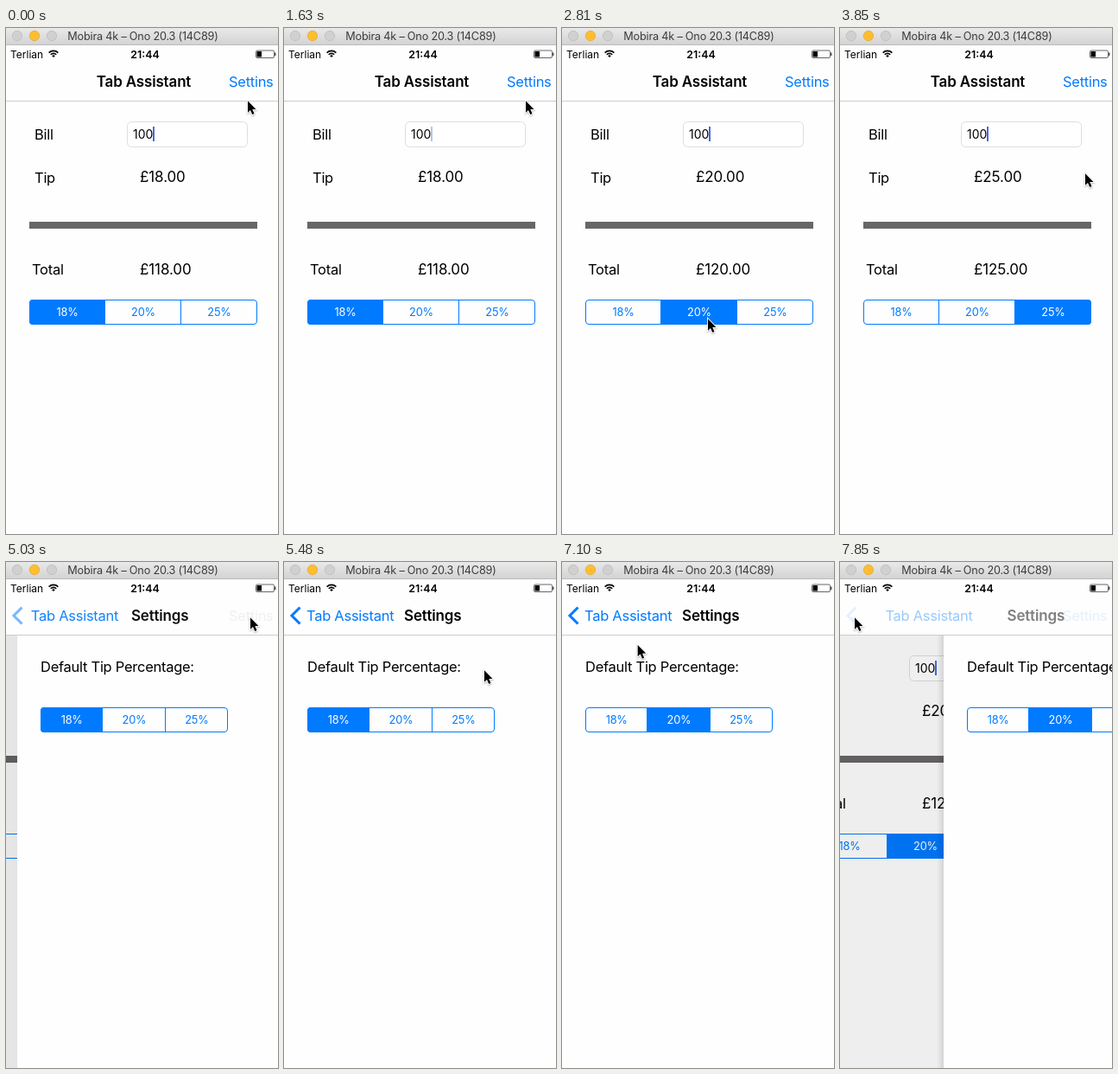
Animation of 315 by 585 pixels, one loop 7990 ms. Source, as an HTML page with a canvas:

```html
<!DOCTYPE html>
<html lang="en">
<head>
<meta charset="utf-8">
<title>Tab Assistant</title>
<style>
  html, body { margin: 0; width: 100%; height: 100%; overflow: hidden; background: #fff; }
  canvas { display: block; width: 315px; height: 585px; }
</style>
</head>
<body>
<canvas id="stage"></canvas>
<script>
const W = 315, H = 585, LOOP = 7990, STEP = 148, LAST = 53;
const BLUE = '#007aff', INK = '#000', PAPER = '#fefefe';
const APP = 'Tab Assistant';
const RATES = [18, 20, 25];
const HEADING = { size: 17, weight: 600, track: -0.01 };
const AMOUNT = { size: 17, track: -0.006 };

const canvas = document.getElementById('stage');
const ctx = canvas.getContext('2d');
const dpr = window.devicePixelRatio || 1;
canvas.width = W * dpr;
canvas.height = H * dpr;

// Pointer path: step, x, y
const PATH = [
  [11, 280, 85], [13, 266, 180], [15, 200, 357], [17, 169, 337], [20, 169, 337],
  [22, 238, 332], [24, 240, 331], [26, 284, 169], [27, 284, 167], [30, 283, 66],
  [31, 283, 65], [35, 283, 65], [36, 272, 100], [39, 152, 178], [40, 140, 184],
  [43, 140, 184], [45, 202, 160], [47, 130, 110], [50, 3, 70], [51, 17, 65]
];

function pointerAt(k) {
  if (k <= PATH[0][0]) return PATH[0].slice(1);
  for (let i = 1; i < PATH.length; i++) {
    const [k1, x1, y1] = PATH[i];
    if (k <= k1) {
      const [k0, x0, y0] = PATH[i - 1];
      const p = (k - k0) / (k1 - k0);
      return [x0 + (x1 - x0) * p, y0 + (y1 - y0) * p];
    }
  }
  return PATH[PATH.length - 1].slice(1);
}

// Fill level of each segment while the choice moves from one to another
function choose(k, at, from, to) {
  const fill = [0, 0, 0];
  if (k <= at) fill[from] = k === at ? 0.77 : 1;
  if (k >= at - 1) fill[to] = k > at ? 1 : k === at ? 0.34 : 0.2;
  return fill;
}

function caretAt(k) {
  if (k === 0 || k >= 52) return 1;
  const p = (k * STEP - 140) % 1010;
  if (p < 110) return 0.4;
  if (p < 465) return 0;
  return p < 550 ? 0.4 : 1;
}

function text(str, x, y, { size = 16.5, weight = 400, track = -0.0165, color = INK, align = 'left', alpha = 1 } = {}) {
  ctx.save();
  ctx.globalAlpha = alpha;
  ctx.font = `${weight} ${size}px Inter, "Liberation Sans", sans-serif`;
  ctx.letterSpacing = `${track * size}px`;
  ctx.textAlign = align;
  ctx.fillStyle = color;
  ctx.fillText(str, x, y);
  ctx.restore();
}

function rect(x, y, w, h, color) {
  ctx.fillStyle = color;
  ctx.fillRect(x, y, w, h);
}

function roundPath(x, y, w, h, r) {
  ctx.beginPath();
  ctx.roundRect(x, y, w, h, r);
}

function segments(x, y, w, fill) {
  const h = 29, cell = w / 3;
  ctx.save();
  roundPath(x, y, w, h, 4);
  ctx.clip();
  RATES.forEach((rate, i) => {
    const left = Math.round(x + i * cell);
    ctx.globalAlpha = fill[i];
    rect(left, y, Math.round(x + (i + 1) * cell) - left, h, BLUE);
    ctx.globalAlpha = 1;
    if (i) rect(left - 1, y, 1, h, BLUE);
    const v = Math.round(255 * fill[i]);
    text(rate + '%', x + (i + 0.5) * cell, y + 19, {
      size: 12.8, align: 'center', color: `rgb(${v},${122 + v * 133 / 255},255)`
    });
  });
  ctx.restore();
  roundPath(x + 0.5, y + 0.5, w - 1, h - 1, 3.5);
  ctx.strokeStyle = BLUE;
  ctx.lineWidth = 1;
  ctx.stroke();
}

function billView(k, dx) {
  const back = k >= 42;
  const fill = back ? [0, 1, 0] : k < 21 ? choose(k, 18, 0, 1) : choose(k, 24, 1, 2);
  const rate = back ? 20 : k < 18 ? 18 : k < 24 ? 20 : 25;
  ctx.save();
  ctx.translate(dx, 0);
  text('Bill', 33, 129);
  roundPath(140.5, 108.5, 139, 29, 5);
  ctx.fillStyle = '#fff';
  ctx.fill();
  ctx.strokeStyle = '#dedede';
  ctx.lineWidth = 1;
  ctx.stroke();
  text('100', 147, 128, { size: 14, track: 0 });
  ctx.globalAlpha = caretAt(k);
  rect(170, 114, 2, 17, '#4669e2');
  ctx.globalAlpha = 1;
  text('Tip', 33, 179);
  text(`£${rate}.00`, 155, 178, AMOUNT);
  rect(27, 224, 264, 8, '#686666');
  text('Total', 30, 285);
  text(`£${100 + rate}.00`, 155, 285, AMOUNT);
  segments(27, 314, 264, fill);
  ctx.restore();
}

function settingsView(k, off) {
  if (off > 0) {
    const g = ctx.createLinearGradient(off - 8, 0, off, 0);
    g.addColorStop(0, 'rgba(0,0,0,0)');
    g.addColorStop(1, `rgba(0,0,0,${0.3 * off / W})`);
    rect(off - 8, 85, 8, H - 85, g);
  }
  ctx.save();
  ctx.translate(off, 0);
  rect(0, 85, W, H - 85, PAPER);
  text('Default Tip Percentage:', 27, 127);
  segments(27, 168, 217, choose(k, 41, 0, 1));
  ctx.restore();
}

function navBar(k, off) {
  rect(0, 20, W, 64, PAPER);
  rect(0, 84, W, 1, '#cdcdcd');
  if (off >= W) {
    text(APP, 159.5, 68, { ...HEADING, align: 'center' });
    text('Settins', 258, 68, { color: BLUE, alpha: k >= 32 ? 0.3 : 1 });
    return;
  }
  const press = k === 52 ? 0.35 : 1;
  ctx.globalAlpha = Math.max(0.1, 1 - off / 28) * press;
  ctx.strokeStyle = BLUE;
  ctx.lineWidth = 3;
  ctx.beginPath();
  ctx.moveTo(18.5, 52.5);
  ctx.lineTo(9, 62);
  ctx.lineTo(18.5, 71.5);
  ctx.stroke();
  ctx.globalAlpha = 1;
  text(APP, 26 + off * 0.22, 68, { color: BLUE, alpha: (1 - off / 200) * press });
  text('Settings', 139 + off * 0.455, 68, { ...HEADING, alpha: 1 - off / 240 });
  if (off > 0) text('Settins', 258, 68, { color: off < 60 ? '#777' : BLUE, alpha: 0.1 });
}

function disc(x, fill, edge) {
  ctx.beginPath();
  ctx.arc(x, 9, 5.7, 0, 7);
  ctx.fillStyle = fill;
  ctx.fill();
  ctx.strokeStyle = edge;
  ctx.lineWidth = 0.8;
  ctx.stroke();
}

function chrome() {
  const g = ctx.createLinearGradient(0, 0, 0, 20);
  g.addColorStop(0, '#e9e9e9');
  g.addColorStop(1, '#d2d2d2');
  rect(0, 0, W, 20, g);
  rect(0, 19, W, 1, '#bcbcbc');
  disc(13, '#d0d0d0', '#bdbdbd');
  disc(33, '#fdbe30', '#e5a93a');
  disc(53, '#d0d0d0', '#bdbdbd');
  text('Mobira 4k – Ono 20.3 (14C89)', 158.5, 14, { size: 12.7, color: '#3c3c3c', align: 'center' });

  text('Terlian', 5, 35, { size: 12, track: 0 });
  ctx.strokeStyle = INK;
  ctx.lineWidth = 1.6;
  for (const r of [4.6, 7.6]) {
    ctx.beginPath();
    ctx.arc(55, 34, r, -Math.PI * 0.75, -Math.PI * 0.25);
    ctx.stroke();
  }
  ctx.fillStyle = INK;
  ctx.beginPath();
  ctx.moveTo(55, 34);
  ctx.arc(55, 34, 2.6, -Math.PI * 0.75, -Math.PI * 0.25);
  ctx.fill();
  text('21:44', 161, 35, { size: 12.4, weight: 600, track: 0, align: 'center' });

  roundPath(289.5, 26, 21, 8.5, 1.5);
  ctx.strokeStyle = '#555';
  ctx.lineWidth = 0.9;
  ctx.stroke();
  rect(290.5, 27, 5.5, 6.5, INK);
  rect(311, 28.5, 1.5, 3.5, '#555');
}

function pointer(x, y) {
  const pts = [[0, 0], [0, 13.4], [3, 10.6], [5.3, 15.8], [7.5, 14.8], [5.3, 9.8], [9.5, 9.6]];
  ctx.save();
  ctx.translate(x, y - 0.7);
  ctx.beginPath();
  pts.forEach(p => ctx.lineTo(...p));
  ctx.closePath();
  ctx.shadowColor = 'rgba(0,0,0,.3)';
  ctx.shadowBlur = 2 * dpr;
  ctx.shadowOffsetY = dpr;
  ctx.strokeStyle = '#fff';
  ctx.lineWidth = 1.8;
  ctx.stroke();
  ctx.shadowColor = 'transparent';
  ctx.fillStyle = INK;
  ctx.fill();
  ctx.restore();
}

// Left edge of the settings page
function pageOffset(k) {
  if (k < 34) return W;
  if (k === 34) return 13;
  return k < LAST ? 0 : 120;
}

function draw(now) {
  const k = Math.min(LAST, Math.floor((now % LOOP + 8) / STEP));
  const off = pageOffset(k);
  const cover = 1 - off / W;
  ctx.setTransform(dpr, 0, 0, dpr, 0, 0);
  rect(0, 0, W, H, PAPER);
  if (off > 0) billView(k, Math.round(-0.306 * W * cover));
  if (off < W) {
    rect(0, 85, off, H - 85, `rgba(0,0,0,${0.1 * cover})`);
    settingsView(k, off);
  }
  navBar(k, off);
  chrome();
  pointer(...pointerAt(k));
}

let start;
function tick(now) {
  if (start === undefined) start = now;
  draw(now - start);
  requestAnimationFrame(tick);
}
requestAnimationFrame(tick);
</script>
</body>
</html>
```
